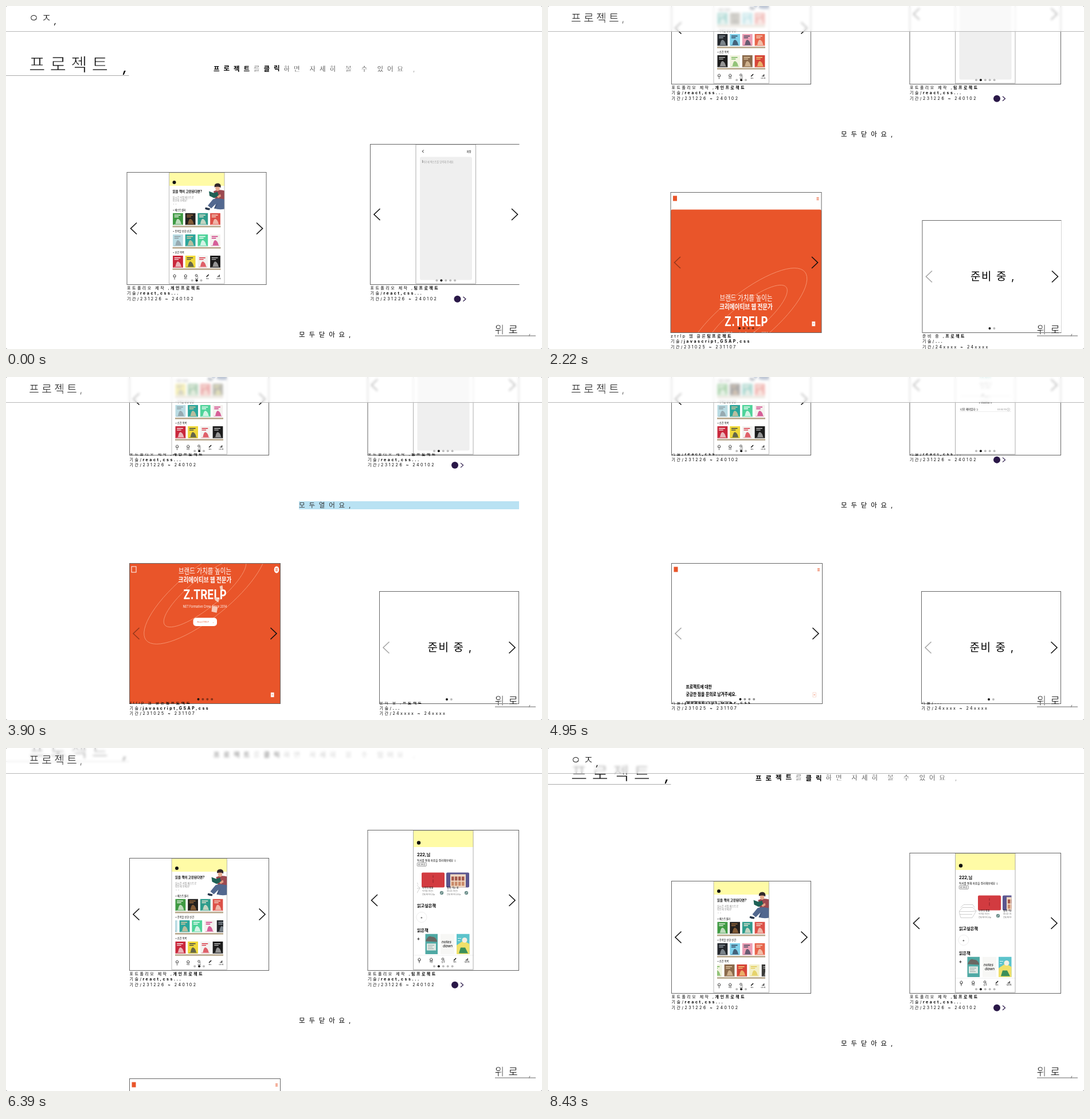
An HTML page for the animation above (8.46 s loop, 935x599 px).

```html
<!DOCTYPE html>
<html lang="ko">
<head>
<meta charset="utf-8">
<title>프로젝트</title>
<style>
html,body{margin:0;width:100%;height:100%;overflow:hidden;background:#999}
#stage{position:absolute;left:0;top:0;width:935px;height:599px;overflow:hidden;background:#fff;border-radius:3px}
#stage>*{position:absolute;left:0;top:0}
#bar{width:935px;height:44px;background:rgba(255,255,255,.62);-webkit-backdrop-filter:blur(2px);backdrop-filter:blur(2px)}
text{font-family:Inter,"Noto Sans CJK KR","Noto Sans CJK",sans-serif;white-space:pre}
/* a white edge thins the strokes where no light Hangul face exists */
.l{font-weight:300;stroke:#fff;stroke-width:.03em}
.b{font-weight:700}.m{text-anchor:middle}.i{font-style:italic}
.lab{letter-spacing:2.5px}
.ink{stroke:#a8452a;stroke-width:.8;stroke-linejoin:round}
</style>
</head>
<body>
<div id="stage">
  <svg id="page" width="935" height="599"></svg>
  <div id="bar"></div>
  <svg id="top" width="935" height="599"></svg>
</div>
<script>
const LOOP = 8460, ORANGE = '#e9552a', YELLOW = '#fffba6';
const $ = id => document.getElementById(id);

// ---- drawing helpers ----
const T = (x, y, size, str, cls = '', a = '') =>
  `<text x="${x}" y="${y}" font-size="${size}" class="${cls}" ${a}>${str}</text>`;
const R = (x, y, w, h, fill, a = '') =>
  `<rect x="${x}" y="${y}" width="${w}" height="${h}" fill="${fill}" ${a}/>`;
const C = (x, y, r, fill, a = '') => `<circle cx="${x}" cy="${y}" r="${r}" fill="${fill}" ${a}/>`;
const P = (d, fill = 'none', a = '') => `<path d="${d}" fill="${fill}" ${a}/>`;
const G = (id, body, a = '') => `<g id="${id}" ${a}>${body}</g>`;
const clip = (x, y, w, h, body) => `<svg x="${x}" y="${y}" width="${w}" height="${h}">${body}</svg>`;
const line = (d, c = '#111', w = .8) => P(d, 'none', `stroke="${c}" stroke-width="${w}"`);
const ls = n => `letter-spacing="${n}"`;
const fill = c => `fill="${c}"`;

const dots = (x, y, n, on, off = '#bbb') =>
  Array.from({length: n}, (_, i) => C(x + i * 7.9, y, 2, i === on ? '#111' : off)).join('');

const chevron = (x, y, dir, c = '#111') =>
  line(`M${x - dir * 10.5} ${y - 10}L${x} ${y}L${x - dir * 10.5} ${y + 10}`, c, 1.6);

const house = (x, y) => line(`M${x - 2.5} ${y}l2.5 -2.3l2.5 2.3M${x - 1.8} ${y - .4}v2.7h3.6v-2.7`);

function nav(x, step, y, s) {
  const at = i => x + step * i;
  const names = ['홈', '책방', '검색', '피드', '내서재'];
  return house(at(0), y) + house(at(1), y) +
    C(at(2) - .4, y - .4, 1.8, 'none', 'stroke="#111" stroke-width=".8"') +
    line(`M${at(2) + 1} ${y + 1}l1.5 1.5`) +
    line(`M${at(3) - 2} ${y + 2}l4 -4`, '#111', 1.5) +
    line(`M${at(4) - 1.5} ${y + 2.2}v-1.4M${at(4)} ${y + 2.2}v-2.6M${at(4) + 1.5} ${y + 2.2}v-4`, '#111', 1) +
    names.map((n, i) => T(at(i), y + 6.3, s, n, 'm')).join('');
}

// cover with two title lines and a small picture
const book = (x, y, w, h, [c, d]) => R(x, y, w, h, c) +
  line(`M${x + w * .15} ${y + h * .18}h${w * .6}M${x + w * .15} ${y + h * .32}h${w * .42}`, d, h * .07) +
  P(`M${x + w * .25} ${y + h * .92}q${w * .1} ${-h * .5} ${w * .3} ${-h * .42}t${w * .28} ${h * .42}z`, d, 'opacity=".75"') +
  line(`M${x + w * .1} ${y + h * .95}h${w * .8}`, d, .5);

// ---- left phone ----
const shelves = [
  '#3f9a43 #e9f2e6,#24211f #a5713f,#2f9c8c #f4e9d5,#dc5148 #f6d9c8,#e9d84c #777,#3f8b4f #dfe8c8,#cf3a3a #f0c8b0,#4c4a35 #d8cf4f,#48a9a0 #e8f0e8,#8a8577 #6d685c,#7cc5cf #e8f4f4,#de6a63 #f7dcd4',
  '#b9dbe3 #8d9aa0,#2ba59b #e8c7a0,#4fd39a #fff,#f4f1ee #cc2f7b,#23272c #9aa4ad,#7fd0ea #2f3c55,#ee9fb5 #38455a,#e7654c #f5ddc8',
  '#c9283c #f4e4e4,#efd83a #37424c,#f3f2f0 #d82f3c,#1c1c1c #bdbdbd,#f1f3df #72b356,#8a6a4c #e4c9a4,#d64538 #f0d27a,#f3efc6 #e2c94e,#3a3a38 #aaa,#f0e9e0 #a88'
].map(s => s.split(',').map(p => p.split(' ')));

const reader =
  P('M151 33q8 -4 19 -1v19h-15z', '#9c4950') +
  P('M170 47q-14 -3 -20 0l-9 11l6 5l8 -8l-3 8q9 3 18 1z', '#52688f') +
  P('M152 63l7 -10l-5 10z', '#3c4e70') +
  P('M137 61l8 2l-1 3q-5 0 -8 -2z', '#263449') +
  P('M143 33l8 3l7 -2l2 7l-8 4l-8 -4z', '#1f6156') +
  P('M157 42l6 -4l1 4l-5 3z', '#e3a386') +
  `<ellipse cx="158" cy="28" rx="3.8" ry="4.500" fill="#e6ab8e"/>` +
  P('M152.500 26q-1 -7 6.500 -7q6 1 4.500 8q-3 -3.500 -11 -1z', '#33282a');

const leftPhone = clip(73.5, .5, 97, 194, `<g transform="translate(-73.5 -.5)">` +
  R(73.5, 0, 97, 23.5, YELLOW) + C(82.5, 17.5, 3, '#111') +
  T(79.5, 35, 5.5, '읽을 책이 고민된다면?', 'b') +
  T(79.5, 45, 4.2, '실시간 <tspan font-weight="500">서점 베스트</tspan>로', '', fill('#888')) +
  T(79.5, 50.2, 4.2, '확인해 보세요!', '', fill('#888')) + T(79.5, 57, 4, '▫▫', '', fill('#888')) + reader +
  ['베스트셀러', '주목할 만한 신간', '신간 목록'].map((s, i) => {
    const y = 71 + i * 37.2;
    return T(80, y - 4, 4.2, '• ' + s, '', 'font-weight="500"') +
      clip(79.5, y, 84, 21, G('row' + i, shelves[i].map((b, k) => book(k * 21.7 + .5, 0, 17.8, 21, b)).join(''))) +
      R(79.5, y + 22.3, 84, 2.7, '#b9a98e');
  }).join('') + nav(83, 19.2, 180.5, 2.8) + '</g>') +
  R(73.5, .5, 96.5, 194, 'none', 'stroke="#aaa" stroke-width=".8"') + dots(113.7, 188.7, 3, 1);

// ---- right phone ----
const editView = line('M93 10l-2.2 2.3l2.2 2.3', '#111', 1) +
  T(168, 14, 4.4, '저장') + R(86.5, 22, 91, 215, '#efefef', 'rx="3"') +
  T(91.5, 32, 4.2, '', '', 'id="memo"') + R(91, 27.5, .5, 5, '#333', 'id="caret"');

const listView = book(116, 50, 32, 43, ['#d9564f', '#f0c4b8']) +
  T(132, 103, 4.5, '나무의 정원', 'm b') + T(132, 110, 4.2, '전체 페이지', 'm', fill('#4aa79c')) +
  T(132, 121, 4.2, '오늘 읽은 곳', 'm', fill('#777')) + T(132, 128, 4.2, '32 / 120', 'm', fill('#777')) +
  line('M88 142h34M141 142h36', '#ccc', .6) + line('M125 142.5l4 -4', '#555', 1.6) +
  T(130, 144, 3.6, '글쓰기', '', fill('#555')) +
  T(132, 154, 5, '&lt; memo &gt;', 'm b') +
  T(88, 166, 4.6, '너무 재미있다 :)') + T(153, 166, 3.8, '03 02 10 ⊗', '', fill('#777')) +
  line('M87 168.8h90', '#ddd', .6);

const shelfItem = (x, title, by, pages) =>
  T(x + 1, 29.5, 4, title, '', 'font-weight="500"') + T(x + 1, 34.8, 3.4, by, '', fill('#666')) +
  T(x + 1, 40, 3.2, pages, '', fill('#666')) + C(x + 35, 36.5, 3.2, '#6d8f8b') +
  line(`M${x + 33.5} 38l3 -3`, '#fff');

const homeView = R(79.5, 0, 105, 29.5, YELLOW) + C(89, 22, 3.2, '#111') +
  T(86, 45.5, 7.4, '222,님', 'b') + T(86, 54.2, 4.6, '독서를 통해 마음을 정리해보세요 :)') +
  R(86.3, 56.8, 16, 6, '#fff', 'stroke="#555" stroke-width=".6" rx="1"') + T(94.3, 61.2, 3.4, '로그아웃', 'm') +
  clip(86, 73, 91.5, 44, G('shelf',
    line('M-25 29l6 -7h18l6 6l-7 12h-20zM-25 29h23l7 -1M-22 22l5 -5h16l3 5M-24 34h22', '#bbb', .7) +
    R(8, 1, 40, 26, '#d23b40', 'rx="2"') + line('M28 6v4M28 13v6', '#8c2228', 1) + shelfItem(8, '나무의 정원', '이가람 (작은)', '전체 페이지 22p') +
    R(51, 1, 40, 26, '#5b568f', 'rx="2"') + R(58, 4, 27, 23, '#f0d9c4') +
    [0, 1, 2, 3].map(i => R(60 + i * 6, 8, 4.5, 7, '#a4574a') + R(60 + i * 6, 17, 4.5, 7, '#c98a6a')).join('') +
    shelfItem(51, '멀리 가는 섬', '정나루 (작은)', '전체 페이지 200p'))) +
  T(86, 134.8, 7.2, '읽고싶은책', 'b') + C(94, 152, 9, '#fff', 'stroke="#e4e4e4" stroke-width=".7"') +
  T(94, 154.2, 6.5, '+', 'm') + T(86, 177.8, 7.2, '읽은책', 'b') + T(88.5, 192.5, 9.5, '+', 'm') +
  clip(100, 181, 77.5, 35.5,
    R(.5, 0, 21.5, 36, '#4fa9a4') + P('M1 13q4 -11 10 -8q9 0 10 9z', '#6b6863') +
    R(3, 17, 16, 12, '#dfe9e4') + line('M5 20h11M5 23h8M5 26h10', '#7a8c88', .7) +
    R(27, 0, 24, 36, '#f7f7f5') + T(29, 16, 6.5, 'notes', 'i') + T(31, 23, 6.5, 'dawn', 'i') +
    R(55, 0, 23, 36, '#5cc3cb') + P('M55 20l12 -8l11 6v18h-23z', '#efe06a') + C(69, 11, 4.5, '#f4eee2') +
    P('M59 34l3 -10h8l5 10z', '#3a8f5a') + line('M57 8h6M57 12h4', '#fff')) +
  line('M79.5 218.5h105', '#ddd', .5) + nav(90, 20.7, 225.5, 3.2);

const rightPhone = clip(79.5, .5, 105, 243, `<g transform="translate(-79.5 -.5)">` +
  G('edit', editView) + G('list', listView) + G('home', homeView) + '</g>') +
  R(79.5, .5, 104.5, 243, 'none', 'stroke="#999" stroke-width=".8"') + dots(116, 237.7, 5, 1);

// ---- agency site video, squeezed horizontally as a whole ----
const ring = (rx, ry) =>
  `<ellipse cx="131.5" cy="222" rx="${rx}" ry="${ry}" transform="rotate(-39 131.5 222)" fill="none" stroke="#f79a78" stroke-width=".8"/>`;
const squeeze = (x, body) => `<g transform="translate(${x} 0) scale(.8 1)">${body}</g>`;

const hero = P('M0 500V33q0 -3 3 -3H260q3 0 3 3V500z', ORANGE) + ring(132, 44) + ring(90, 26) +
  squeeze(131.5,
    T(0, 189, 13, '브랜드 가치를 높이는', 'm', fill('#fff')) +
    T(0, 205, 12, '크리에이티브 웹 전문가', 'm b', fill('#fff')) +
    T(0, 233.5, 23, 'Z.TRELP', 'm b', fill('#fff')) +
    T(0, 248.5, 6.2, 'NET Formative Crew, Since 2014', 'm', fill('#fff'))) +
  G('bits', P('M157 212l5 -2l1 7l-4 2zM149 231l7 3l-1 6l-6 -4zM144 246l10 2l-2 10l-9 -2z', '#f7c9b8')) +
  R(111, 266, 41.5, 14.5, '#fff', 'rx="5"') + T(128, 274.6, 3, 'About ZTRELP', 'm', fill(ORANGE)) +
  T(146, 275, 4, '›', 'm', fill(ORANGE));

const outline = (d, f = '#fff') => P(d, f, 'class="ink"');
const figure = (x, y) => outline(`M${x} ${y + 2}l1 5l-3 4M${x + 1} ${y + 7}l3 3M${x - 3} ${y + 5}l3 -2l4 2`, 'none') +
  P(`M${x - 1.5} ${y + 2}h3l1 5h-3z`, ORANGE) + C(x, y, 1.6, '#fff', 'class="ink"');

const office =
  outline('M134 172v7l34 39l74 -62v-9l-74 62z') +
  outline('M136 172l78 -57q3 -2 5 1l21 32q2 3 -1 5l-66 55q-3 3 -6 0l-31 -31q-3 -3 0 -5z') +
  outline('M142 181l70 -53l22 24l-64 50z') +
  outline('M149 135l17 -7v26l-17 9zM153 137v21M166 132l14 10v24l-14 -12zM168 139l10 7') +
  outline('M196 124q14 -13 30 -11q2 10 -10 17l-22 9z') +
  P('M190 139l9 -8l3 3l4 -8l12 11l-2 9l-14 12l-13 -8z', '#1d1d1d') +
  P('M198 142l6 -7l5 2l1 5l-6 6zM209 131l4 4l-3 4l-4 -4z', ORANGE) +
  outline('M190 151l-6 5l3 3l7 -5zM206 157l5 4l8 -6l-4 -4z') +
  P('M159 190l10 -8l15 12l-10 9z', '#1d1d1d') + outline('M159 190v5l14 13v-5zM184 194v4l-11 9v-4z') +
  outline('M185 163l12 -8v10l-12 8zM188 165l6 -4M200 174l14 -10v9l-14 10zM203 175l8 -6M212 152l12 -8v8l-12 9zM176 170l7 -5v8l-7 5zM222 139l7 7l-6 5M148 176l10 10M154 172l9 9') +
  figure(160, 170) + figure(176, 155) + figure(184, 182) + figure(208, 163) + figure(227, 107) + figure(167, 127) +
  figure(181, 124) + figure(194, 166) + figure(221, 148) + figure(151, 178) +
  `<g transform="rotate(-28 197 100)">` +
  outline('M188 85h20q5 0 5 5v20q0 5 -5 5h-13l-6 8v-8h-2q-5 0 -5 -5v-20q0 -5 6 -5z') +
  T(197.5, 96, 5.2, 'beep beep', 'm i b', fill('#a8452a')) + T(197.5, 103, 5.2, 'beep...', 'm i b', fill('#a8452a')) + '</g>';

let scallop = 'M0 245V216';
for (let i = 0; i < 10; i++) scallop += 'a14 13 0 0 1 27.3 0';

const contact = squeeze(25,
  T(0, 39.3, 8.5, '프로젝트에 대한', 'b') + T(0, 53, 8.5, '궁금한 점을 문의로 남겨주세요.', 'b') +
  T(0, 65, 3.7, '<tspan class="b">새로운 프로젝트의 첫 걸음</tspan>을 기반으로 브랜드 가치를 높여가세요.') +
  T(0, 70.2, 3.7, '브랜드 성격을 이해하는 파트너와 함께 더 나은 결과를 만듭니다.') +
  T(0, 81.5, 3.1, '서울시 하늘구 구름로 10 (가나동, 나래빌딩) 3층') + T(0, 87, 3.1, 'hello@example.com') +
  T(8, 173.3, 6.2, '<tspan class="b">프로젝트</tspan> 문의하기', '', fill('#8a3f28')) +
  T(8, 188, 6.2, '<tspan class="b">브로슈어</tspan> 신청하기', '', fill('#8a3f28'))) +
  line('M26.5 173.5l4 -4.5', '#8a3f28', 1.4) + line('M26.5 182.5h3.5v5.5h-3.5z', '#8a3f28') +
  line('M25 178.5h41M25 192.5h41', '#e3b5a6', .6) + office +
  P(scallop + 'V245z', ORANGE) +
  T(11.5, 240.5, 3, 'Since 2014 NET Formative Crew', '', fill('#fff')) + T(208, 240.5, 2.8, 'example.com', '', fill('#fff')) +
  R(236.5, 235.5, 16, 6, '#fff', 'rx="3"') + T(244.5, 239.6, 2.8, 'Family Site', 'm');

const site = clip(0, 0, 263, 245, G('site', hero + `<g transform="translate(0 760)">${contact}</g>`)) +
  R(3.5, 5.5, 8, 10, ORANGE, 'stroke="#fff" stroke-width="1"') +
  `<ellipse cx="256.5" cy="11" rx="4.3" ry="6" fill="#fff"/>` +
  line('M254.5 9h4M254.5 11h4M254.5 13h4', ORANGE, .9) +
  R(246.5, 225.5, 5.5, 8, '#fff', 'stroke="#f0b8a4" stroke-width=".5"') + line('M248 229.5h2.5', ORANGE) +
  dots(120, 237.3, 4, 0, 'rgba(0,0,0,.42)');

// ---- cards ----
function card(id, x, y, w, h, body, [lead, kind, tech, span], dim, link) {
  const label = T(0, 11.1, 7, `${lead}<tspan class="b">${kind}</tspan>`, 'lab') +
    T(0, 20.6, 7, `기술/<tspan class="b">${tech}</tspan>`, 'lab') + T(0, 30.1, 7, '기간/' + span, 'lab') +
    (link ? C(152, 28.2, 6, '#2a1848') + line('M162 24.2l4.5 4l-4.5 4', '#2a1848', 1.2) : '');
  return G(id, `<g transform="translate(${x} ${y})">` + R(0, 0, w, h, '#fff') + body +
    chevron(6.5, h / 2, -1, dim ? 'rgba(0,0,0,.35)' : '#111') + chevron(w - 6.5, h / 2, 1) +
    R(0, 0, w, h, 'none', 'stroke="#666" stroke-width="1"') +
    clip(-1, h - 3, 300, 42, `<g class="label">${label}</g>`) + '</g>');
}

const letters = [...'프로젝트를클릭'];
$('page').innerHTML = G('scroll',
  T(40, 112.5, 31, '프로젝트', 'l', ls(8)) + T(204, 115.5, 25, ',', 'i', 'font-weight="500"') +
  line('M0 121.5H214.5', '#aaa', 1) +
  letters.map((c, i) => T(362 + i * 17.5, 114, 11.5, c, i === 4 ? 'l' : 'b wave', `data-i="${i}"`)).join('') +
  T(484.5, 114, 11.5, '하면 자세히 볼 수 있어요 ,', 'l', ls(6.9)) +
  R(511, 567, 384, 14, '#b9e2f3', 'id="tap"') +
  T(511, 578.2, 11.5, '', '', 'id="toggle" ' + ls(6.8)) +
  `<svg width="895.5" height="1100">` +
  card('a', 215.5, 290.5, 243, 196, leftPhone, ['포트폴리오 제작 ,', '개인프로젝트', 'react,css...', '231226 ~ 240102']) +
  card('b', 631, 241.5, 263.5, 245, rightPhone, ['포트폴리오 제작 ,', '팀프로젝트', 'react,css...', '231226 ~ 240102'], false, true) +
  card('c', 215.5, 675.5, 263, 245, site, ['ztrlp 웹 클론', '팀프로젝트', 'javascript,GSAP,css', '231025 ~ 231107'], true) +
  card('d', 651.5, 724.5, 243, 196, T(84, 104.5, 19, '준비 중 ,', '', ls(1.6)) + dots(117.5, 188.5, 2, 0),
    ['준비 중 ,', '프로젝트', '...', '24xxxx ~ 24xxxx'], true) + '</svg>');

$('top').innerHTML = line('M0 44.5H935', '#b8b8b8', 1) +
  G('home0', T(39.5, 28, 19.5, 'ㅇㅈ', 'l', ls(4)) + T(84, 30.5, 15, ',', 'i')) +
  G('title', T(40, 28, 19.5, '프로젝트,', 'l', ls(4.1))) +
  T(852.5, 571.5, 18, '위로', 'l', ls(7.3)) + T(912, 573.5, 16, ',', 'i l') + line('M853 576H924', '#666', 1);

// ---- motion ----
const clamp = v => Math.max(0, Math.min(1, v));
function at(t, keys) {
  let i = 0;
  while (i < keys.length - 1 && t >= keys[i + 1][0]) i++;
  const [t0, a] = keys[i], [t1, b] = keys[i + 1] || [t0 + 1, a];
  const u = clamp((t - t0) / (t1 - t0));
  return a + (b - a) * u * u * (3 - 2 * u);
}
const move = (el, x, y) => el.setAttribute('transform', `translate(${x.toFixed(2)} ${y.toFixed(2)})`);
const show = (id, v) => $(id).setAttribute('opacity', +v);

const SCROLL = [[0, 0], [400, 0], [1340, 175], [2030, 175], [2200, 350], [5703, 350], [6600, 58]];
const FOLD = [[0, 0], [3790, 0], [4153, 34], [4770, 34], [5133, 0]];
const SITE = [[0, 0], [2850, 0], [3750, 171], [4000, 171], [5500, 760]];
const ROWS = [
  [[0, 0], [1900, 0], [2150, 8], [2950, 8], [3250, 4], [4500, 4], [4900, 0]],
  [[0, 0], [700, 0], [1050, 4], [2950, 4], [3300, 0], [6300, 0], [6650, 4]],
  [[0, 0], [1850, 0], [2100, 3], [2950, 3], [3300, 0], [8100, 0], [8430, 4.44]]
];
const TYPED = ['ㄴ', '너', '너무', '너무 ㅈ', '너무 재', '너무 재미', '너무 재밌'];
const labels = [...document.querySelectorAll('.label')];
const waves = [...document.querySelectorAll('.wave')];

function draw(t) {
  const s = Math.round(at(t, SCROLL));
  move($('scroll'), 0, -s);
  const named = clamp((s - 76) / 8);
  show('title', named);
  show('home0', 1 - named);

  const in1 = 4.5 * Math.exp(-t / 160), in2 = 11 * Math.exp(-Math.max(0, t - 2040) / 90);
  move($('a'), -in1, 0);
  move($('b'), in1, 0);
  move($('c'), -in2, 0);
  move($('d'), in2, 0);
  const shown = clamp((t - 2030) / 60);
  show('c', shown);
  show('d', shown);

  const amp = at(t, [[0, .6], [400, 1.5], [1400, 1.5], [1500, 0], [7280, 0], [7700, 1.5]]);
  for (const w of waves) move(w, 0, amp * Math.sin(2.2 + (t - 8430) / 130 - 1.25 * w.dataset.i));

  const fold = at(t, FOLD);
  labels.forEach(l => move(l, 1, -fold));
  const closed = t >= 3790 && t < 4770;
  $('toggle').textContent = closed ? '모두열어요,' : '모두닫아요,';
  $('toggle').setAttribute('fill', closed ? '#333' : '#000');
  show('tap', (t >= 3790 && t < 3990) || (t >= 4770 && t < 4950));

  ROWS.forEach((k, i) => move($('row' + i), -21.7 * at(t, k), 0));
  const y = at(t, SITE);
  move($('site'), 0, -y);
  show('bits', clamp((y - 60) / 90));
  move($('bits'), 0, 2 * Math.sin(t / 400));

  show('edit', t < 4400);
  show('list', t >= 4400 && t < 6300);
  show('home', t >= 6300);
  move($('shelf'), at(t, [[0, 0], [7700, 0], [8400, 25]]), 0);
  const n = Math.min(TYPED.length - 1, Math.floor((t - 600) / 105));
  const memo = $('memo'), typing = n >= 0;
  memo.textContent = typing ? TYPED[n] : '여기에 텍스트를 입력해 주세요';
  memo.setAttribute('fill', typing ? '#333' : '#999');
  $('caret').setAttribute('x', typing ? 92 + memo.getComputedTextLength() : 91);
}

const start = performance.now();
function tick() {
  draw((performance.now() - start) % LOOP);
  requestAnimationFrame(tick);
}
draw(0);
requestAnimationFrame(tick);
</script>
</body>
</html>
```
